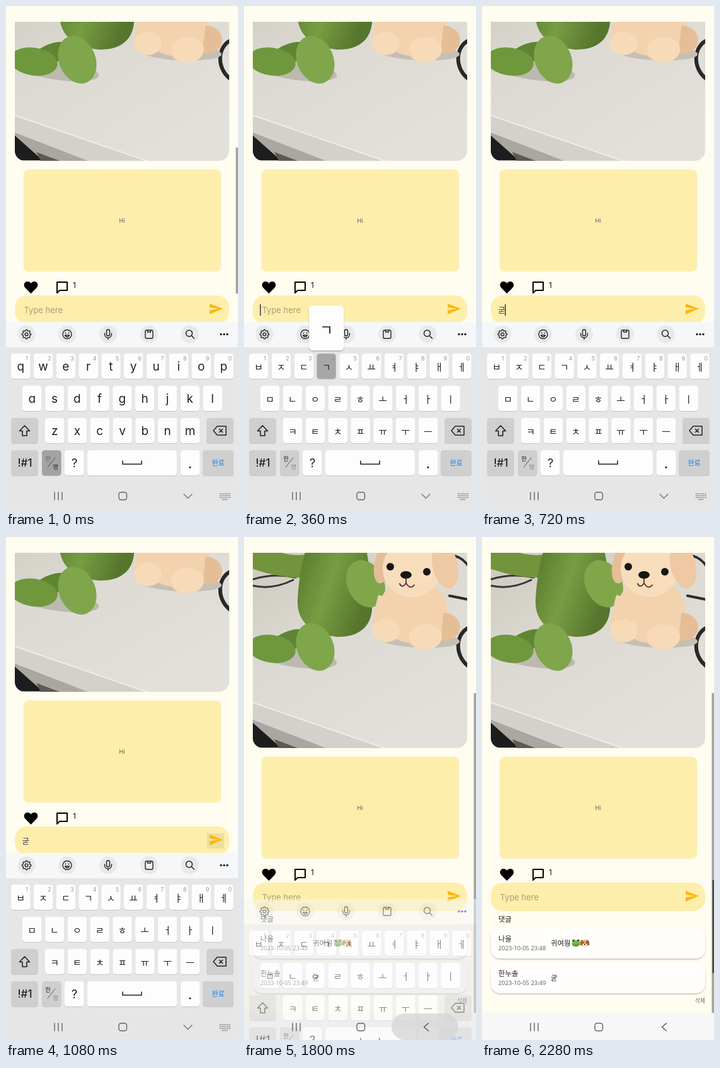
Recreate the animation shown at these times as an HTML page. Size 368 px wide and 796 px high, loop 2400 ms.

```html
<!DOCTYPE html>
<html lang="ko">
<head>
<meta charset="utf-8">
<title>Comment</title>
<style>
html, body { margin: 0; width: 100%; height: 100%; overflow: hidden; background: #fffcf0; }
svg { display: block; width: 368px; height: 796px; }
text { font-family: Inter, "Noto Sans CJK KR", "Noto Sans CJK JP", sans-serif; font-feature-settings: "cv11"; white-space: pre; }
.date { font-family: "Noto Sans", sans-serif; }
.line { fill: none; stroke-linecap: round; stroke-linejoin: round; }
</style>
</head>
<body>
<svg id="stage" viewBox="0 0 368 796"></svg>
<script>
const LOOP = 2400, STEP = 120, SCROLL = 89;
const CREAM = '#fffcf0', YELLOW = '#fdeeac', INK = '#222';

const rect = (x, y, w, h, r, fill, extra = '') =>
  `<rect x="${x}" y="${y}" width="${w}" height="${h}" rx="${r}" fill="${fill}" ${extra}/>`;
const oval = (x, y, rx, ry, fill, turn = 0) =>
  `<ellipse cx="${x}" cy="${y}" rx="${rx}" ry="${ry}" fill="${fill}" transform="rotate(${turn} ${x} ${y})"/>`;
const dot = (x, y, r, fill) => oval(x, y, r, r, fill);
const shape = (d, fill) => `<path d="${d}" fill="${fill}"/>`;
const line = (d, color = INK, width = 1.4) =>
  `<path class="line" d="${d}" stroke="${color}" stroke-width="${width}"/>`;
const text = (s, x, y, size, fill = INK, extra = '') =>
  `<text x="${x}" y="${y}" font-size="${size}" fill="${fill}" ${extra}>${s}</text>`;
const mid = (s, x, y, size, fill, extra = '') =>
  text(s, x, y, size, fill, 'text-anchor="middle" ' + extra);
const group = (id, body, extra = '') => `<g id="${id}" ${extra}>${body}</g>`;

function photo() {
  const fur = '#f3d2ae', shade = '#e5be98';
  return `<g clip-path="url(#photoClip)">` +
    rect(14, 0, 340, 340, 0, 'url(#table)') +
    line('M14 67 Q48 57 82 64 M14 77 Q45 84 78 68', '#34352f', 3) +
    line('M320 30 Q342 26 356 46 M326 93 L356 99', '#2d2d2b', 4) +
    line('M360 142 C334 150 332 191 360 207', '#272828', 6) +
    shape('M14 261 L226 334 H130 L14 288Z', '#d3d1cc') +
    line('M14 262 L226 335', '#f0eeea', 2) +
    shape('M14 289 L130 334 H14Z', '#aaa7a0') +
    shape('M14 294 L58 333 H14Z', '#1b1d1e') +
    shape('M48 320 L85 334 H55Z', '#5d5a53') +
    // shadows on the table
    oval(82, 190, 66, 16, '#bcbab0', 8) + oval(276, 162, 66, 13, '#c6bfb4', 3) +
    // green plush
    shape('M10 25 L60 25 Q85 32 108 26 L105 64 Q60 67 10 49Z', '#71943c') +
    oval(75, 163, 32, 15, '#5f8532', -18) +
    oval(44, 177, 38, 22, '#6f983d', 8) +
    shape('M98 20 H194 Q202 60 203 103 C206 140 184 159 147 158 C104 153 83 132 85 98 Q87 58 98 20Z', 'url(#green)') +
    oval(113, 174, 29, 39, '#7fa64b', -22) +
    oval(193, 74, 29, 39, '#80a64a', -25) +
    // cream plush
    oval(268, 116, 54, 52, fur) +
    oval(318, 142, 25, 22, shade, 8) +
    shape('M213 92 Q207 112 203 146 Q207 166 225 167 Q246 165 249 146 L256 100Z', fur) +
    oval(225, 148, 22, 18, '#f7dbb9') +
    shape('M276 98 Q267 126 258 157 Q265 180 289 178 Q314 174 313 151 L318 105Z', fur) +
    oval(288, 158, 26, 20, '#f7dbb9') +
    oval(221, 42, 14, 32, shade, 12) + oval(266, 50, 46, 45, '#f8ddbd') +
    oval(319, 45, 20, 37, '#eec9a3', -13) +
    dot(232, 47, 6, '#171615') + dot(290, 55, 6, '#171615') + oval(257, 60, 9, 6, '#171615') +
    line('M257 66 V73 Q251 82 247 74 M257 73 Q264 84 270 76', '#5b4032', 2) +
    '</g>';
}

function comment(y, name, time, words) {
  return rect(14, y, 340, 48, 15, '#fffefd', 'filter="url(#cardShadow)"') +
    text(name, 26, y + 21, 11.4, INK, 'font-weight="500"') +
    text('2023-10-05 ' + time, 26, y + 35, 9.4, '#666', 'class="date"') +
    text(words, 109, y + 28, 11.4, INK, 'font-weight="500"');
}

const frogIcon = dot(145.5, 639, 2.6, '#67a343') + dot(152.5, 639, 2.6, '#67a343') +
  oval(149, 643.5, 6.5, 5, '#75b44c') + dot(145.5, 639, 1, INK) + dot(152.5, 639, 1, INK) +
  line('M145 645 Q149 648 153 645', '#354d2c', .8);
const dogIcon = oval(163, 643, 6, 6, '#e6b067') + oval(157.8, 642, 2, 4.5, '#a66333', 15) +
  oval(168.2, 642, 2, 4.5, '#a66333', -15) + oval(163, 646, 3.3, 2.8, '#fff0dc') +
  dot(160.7, 642, .9, INK) + dot(165.3, 642, .9, INK) + dot(163, 644.8, 1.1, INK);

const content = photo() +
  rect(28, 348, 313, 161, 8, YELLOW, 'stroke="#faf0c8" stroke-width="1"') +
  mid('Hi', 184, 432, 9, '#555') +
  shape('M39.5 544 L31 535.5 C26.5 531 29 525 34 525 Q38 525 39.5 528 Q41 525 45 525 C50 525 52.500 531 48 535.500Z', '#000') +
  line('M81 526 H97 V539 H85 L81 543Z', '#000', 2) +
  text('1', 106, 534.500, 12, '#111') +
  rect(14, 547, 340, 45, 19, YELLOW) +
  group('ripple', rect(319, 558, 27, 24, 1, '#baa96f', 'opacity=".22"')) +
  shape('M323 577 L344 568 L323 560 V566 L337 568 L323 570.500Z', '#fdb70d') +
  text('Type here', 28.5, 574.500, 13, '#aaa06f', 'id="hint"') +
  text('', 25.5, 574.500, 12.5, '#444', 'id="typed"') +
  rect(25, 561, 2, 18, 0, '#686451', 'id="caret"') +
  text('댓글', 26, 609, 11.4, INK, 'font-weight="500"') +
  comment(619, '나울', '23:48', '귀여웡') + frogIcon + dogIcon +
  comment(674, '한누솔', '23:49', '굳') +
  text('삭제', 338, 736.500, 8.7, '#666');

const PITCH = 35.8;
const key = (x, y, w, fill = '#fdfdfd') =>
  rect(x, y + 1, w, 40, 4.5, '#c6c6c8') + rect(x, y, w, 40, 4.5, fill);

function gear(x, y) {
  let d = '';
  for (let i = 0; i <= 64; i++) {
    const a = i * Math.PI / 32, r = 6.4 + .9 * Math.cos(8 * a);
    d += (i ? 'L' : 'M') + (x + r * Math.cos(a)).toFixed(1) + ' ' + (y + r * Math.sin(a)).toFixed(1);
  }
  return line(d + 'Z') + `<circle class="line" cx="${x}" cy="${y}" r="2.400" stroke="${INK}" stroke-width="1.400"/>`;
}

const toolbar = rect(0, 500, 368, 40, 0, '#f6f7f9') +
  [32.5, 97, 162, 227, 291.5].map(x => dot(x, 519.5, 14, '#e8e9eb')).join('') +
  gear(32.5, 519.5) +
  line('M104 519.500 A7 7 0 1 1 90 519.500 A7 7 0 1 1 104 519.500 M93.500 521 Q97 526.500 100.500 521Z') +
  dot(94.5, 517.5, 1, INK) + dot(99.5, 517.5, 1, INK) +
  rect(159.5, 512, 5, 10, 2.5, 'none', `stroke="${INK}" stroke-width="1.4"`) +
  line('M156.500 518 V519.500 Q157 525 162 525 Q167 525 167.500 519.500 V518 M162 525 V527.500') +
  rect(221, 513, 12, 13, 2, 'none', `stroke="${INK}" stroke-width="1.4"`) +
  line('M224.500 513 V516 H229.500 V513') +
  line('M295.500 518 A5 5 0 1 1 285.500 518 A5 5 0 1 1 295.500 518 M294.500 522 L298.500 526', INK, 1.5) +
  [341, 346, 351].map(x => dot(x, 519.5, 1.7, INK)).join('');

const rows = [
  { x: 8, y: 550, en: 'qwertyuiop', ko: 'ㅂㅈㄷㄱㅅㅛㅕㅑㅐㅔ' },
  { x: 26, y: 601, en: 'asdfghjkl', ko: 'ㅁㄴㅇㄹㅎㅗㅓㅏㅣ' },
  { x: 62, y: 652, en: 'zxcvbnm', ko: 'ㅋㅌㅊㅍㅠㅜㅡ' }
];
const spots = {};
let caps = '', en = '', ko = '', digits = '';
rows.forEach((row, n) => [...row.en].forEach((ch, i) => {
  const x = row.x + i * PITCH, c = x + 15.2, jamo = row.ko[i];
  spots[jamo] = { x, y: row.y };
  caps += key(x, row.y, 30.5);
  en += mid(ch, c, row.y + 27, 19, INK);
  ko += mid(jamo, c, row.y + 27, 15, INK, 'font-weight="500"');
  if (!n) digits += mid((i + 1) % 10, c + 10, 561, 9, '#999');
}));

const GRAY = '#cfcfd0';
const keyboard = rect(0, 500, 368, 296, 0, '#e6e6e7') + toolbar + caps +
  rect(0, 0, 30.5, 40, 4.5, '#a7a7a8', 'id="held"') +
  group('en', en) + group('ko', ko) + digits +
  key(8, 652, 43, GRAY) + key(318, 652, 43, GRAY) +
  line('M29.500 664 L37.500 672.500 H33 V680 H26 V672.500 H21.500Z', INK, 1.6) +
  line('M329 672 L335 665 H349 V679 H335Z M338.500 669.500 L343.500 674.500 M343.500 669.500 L338.500 674.500', INK, 1.5) +
  key(8, 703, 43, GRAY) + key(57, 703, 30.5, GRAY) + key(93, 703, 30.5) +
  key(129, 703, 142) + key(277, 703, 30.5) + key(312, 703, 49, GRAY) +
  rect(57, 703, 30.5, 40, 4.5, '#a3a3a4', 'id="langHeld"') +
  mid('!#1', 30, 729, 17, INK, 'font-weight="500"') +
  mid('한', 66.500, 719.500, 9.500, INK, 'id="langKo"') + line('M66 730 L78 715', '#555', 1) +
  mid('영', 78.500, 732.500, 9.500, INK, 'id="langEn"') +
  mid('?', 108.500, 729.500, 19, INK) +
  line('M185 720 V725 H215 V720', INK, 1.600) +
  dot(292, 730, 1.600, INK) +
  mid('완료', 336.500, 727, 11, '#1580e8', 'font-weight="500"');

let boardIcon = '';
for (let i = 0; i < 18; i++)
  boardIcon += rect(339 + i % 6 * 3, 771 + Math.floor(i / 6) * 3, 1.6, 1.6, 0, '#777');
boardIcon += line('M343 781 H351', '#777', 1.2);

const nav = line('M77 769.500 V781.500 M83 769.500 V781.500 M89 769.500 V781.500', '#646464', 1.400) +
  rect(179, 769.5, 12.5, 12, 3.5, 'none', 'stroke="#646464" stroke-width="1.4"') +
  group('down', line('M282 772.500 L288.500 779 L295 772.500', '#777', 1.400) + boardIcon) +
  line('M292.500 769.500 L285.500 775.500 L292.500 781.500', '#555', 1.500).replace('<path', '<path id="back"');

const stage = document.getElementById('stage');
stage.innerHTML = `<defs>
  <linearGradient id="table" x1="0" y1="0" x2=".6" y2="1">
    <stop offset="0" stop-color="#c9c6bc"/><stop offset=".45" stop-color="#dcd9d2"/><stop offset="1" stop-color="#e2e0da"/>
  </linearGradient>
  <linearGradient id="green" x2="1" y2=".4">
    <stop stop-color="#57782d"/><stop offset=".5" stop-color="#779d43"/><stop offset="1" stop-color="#56752d"/>
  </linearGradient>
  <filter id="cardShadow"><feDropShadow dx="0" dy="1.5" stdDeviation=".8" flood-opacity=".25"/></filter>
  <clipPath id="photoClip"><rect x="14" y="0" width="340" height="334" rx="16"/></clipPath>
  <clipPath id="view"><rect y="25" width="368" height="771"/></clipPath>
</defs>` +
  rect(0, 0, 368, 796, 0, CREAM) +
  `<g clip-path="url(#view)">${group('content', content)}</g>` +
  rect(364.5, 0, 3.5, 10, 0, '#a3a29d', 'id="bar"') +
  rect(365.5, 543, 2.5, 147, 0, '#454545', 'id="pageBar"') +
  rect(0, 753, 368, 43, 0, '#f7f7f8', 'id="navBack"') +
  group('board', keyboard) +
  rect(234, 754, 106, 42, 21, '#d4d4d5', 'id="press"') + nav +
  group('popup', rect(0, 0, 55, 71, 6, '#fdfdfd', 'filter="url(#cardShadow)"') +
    mid('', 27.5, 47, 23, INK, 'id="popupText" font-weight="500"'));

const el = {};
stage.querySelectorAll('[id]').forEach(e => el[e.id] = e);
const show = (id, on) => el[id].setAttribute('opacity', Number(on));
const move = (id, x, y) => el[id].setAttribute('transform', `translate(${x} ${y})`);

function draw(t) {
  const n = Math.floor(t / STEP), typing = n < 15, korean = n > 0;

  move('content', 0, typing ? -SCROLL : 0);
  show('board', typing ? 1 : n === 15 ? .5 : 0);
  move('board', 0, typing ? 0 : 73);
  show('navBack', !typing);
  show('down', typing);
  show('back', !typing);
  show('press', typing ? 0 : .75 * .3 ** (n - 15));

  el.bar.setAttribute('y', typing ? 224 : 247);
  el.bar.setAttribute('height', typing ? 231 : 506);
  show('bar', typing ? Math.max(0, 1 - n / 2) : 1);
  show('pageBar', n > 15);

  show('en', !korean);
  show('ko', korean);
  show('langHeld', !korean);
  el.langKo.setAttribute('fill', korean ? INK : '#666');
  el.langEn.setAttribute('fill', korean ? '#888' : INK);

  const jamo = { 3: 'ㄱ', 4: 'ㅜ', 5: 'ㄷ' }[n], at = spots[jamo];
  show('popup', !!at);
  show('held', at && n < 5 ? 1 : 0);
  if (at) {
    move('popup', at.x - 12.2, at.y - 76);
    move('held', at.x, at.y);
    el.popupText.textContent = jamo;
  }

  const typed = n < 4 || n > 9 ? '' : n === 4 ? 'ㄱ' : n === 5 ? '구' : '굳';
  el.typed.textContent = typed;
  show('hint', !typed);
  show('caret', n > 1 && n < 8 || n > 9 && n < 13);
  move('caret', typed ? 11 : 0, 0);
  show('ripple', n > 7 && n < 11);
}

function tick(now) {
  draw(now % LOOP);
  requestAnimationFrame(tick);
}
draw(0);
requestAnimationFrame(tick);
</script>
</body>
</html>
```
